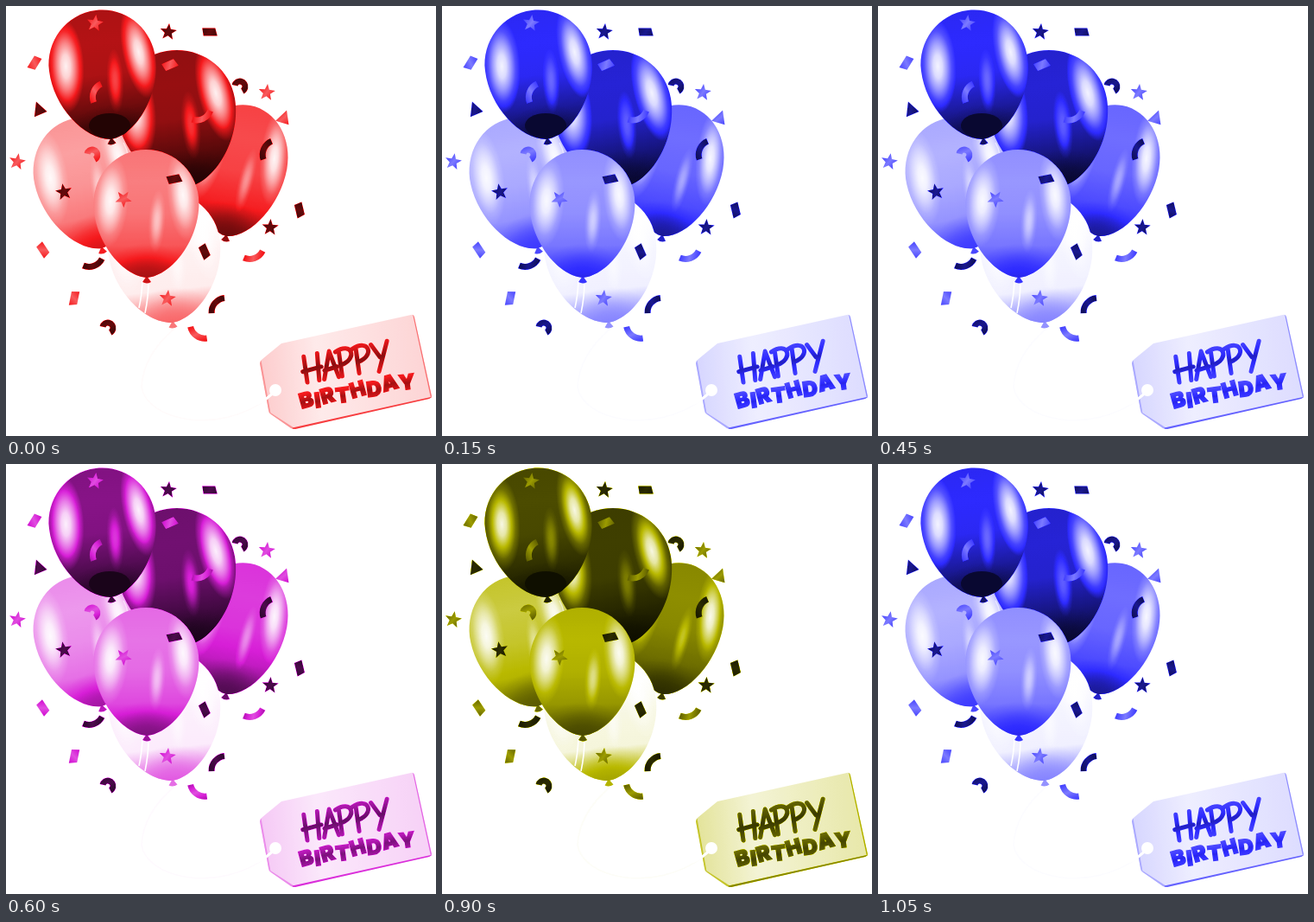
Animation, 498 px wide and 497 px high, one loop 1200 ms. Source, as an HTML page with a canvas:

```html
<!DOCTYPE html>
<html lang="en">
<head>
<meta charset="utf-8">
<title>Happy Birthday</title>
<style>
html, body { margin: 0; width: 100%; height: 100%; overflow: hidden; background: #fff; }
canvas { display: block; }
</style>
</head>
<body>
<canvas id="stage" width="498" height="497" role="img" aria-label="Happy Birthday balloons"></canvas>
<script>
const W = 498, H = 497, STEP = 150, DEG = Math.PI / 180;
const stage = document.getElementById('stage').getContext('2d');
const art = document.createElement('canvas');
art.width = W;
art.height = H;
const g = art.getContext('2d', { willReadFrequently: true });

// The scene is painted in grey; each hue then maps black - hue - white onto it.
const grey = (y, a = 1) => {
  const v = Math.round(Math.min(1, y) * 255);
  return `rgba(${v},${v},${v},${a})`;
};

function ramp(x0, y0, x1, y1, ...tones) {
  const fill = g.createLinearGradient(x0, y0, x1, y1);
  tones.forEach((y, i) => fill.addColorStop(i / (tones.length - 1), grey(y)));
  return fill;
}

function placed(x, y, angle, draw) {
  g.save();
  g.translate(x, y);
  g.rotate(angle);
  draw();
  g.restore();
}

function line(width, tone, path) {
  g.lineWidth = width;
  g.strokeStyle = grey(tone);
  g.stroke(new Path2D(path));
}

function glow(x, y, rx, ry, deg, tone, alpha) {
  placed(x, y, deg * DEG, () => {
    g.scale(rx, ry);
    const fill = g.createRadialGradient(0, 0, 0, 0, 0, 1);
    for (let d = 0; d <= 1; d += 0.25) {
      fill.addColorStop(d, grey(tone, alpha * (1 - d * d) ** 2));
    }
    g.fillStyle = fill;
    g.fillRect(-1, -1, 2, 2);
  });
}

// Runs from crown (tx, ty) to knot (bx, by); w is half the width.
function balloon(tx, ty, bx, by, w, tone) {
  const len = Math.hypot(bx - tx, by - ty);
  const low = tone ** 1.3, foot = 0.6 * tone ** 2 + 0.02;
  placed(tx, ty, Math.atan2(by - ty, bx - tx) - Math.PI / 2, () => {
    g.fillStyle = grey(foot + 0.05);
    g.beginPath();
    g.moveTo(0, len - 2);
    g.lineTo(5, len + 5);
    g.quadraticCurveTo(0, len + 8, -5, len + 5);
    g.fill();

    g.beginPath();
    g.moveTo(0, 0);
    g.bezierCurveTo(w * 0.56, 0, w, len * 0.19, w, len * 0.42);
    g.bezierCurveTo(w, len * 0.7, w * 0.5, len * 0.98, 0, len);
    g.bezierCurveTo(-w * 0.5, len * 0.98, -w, len * 0.7, -w, len * 0.42);
    g.bezierCurveTo(-w, len * 0.19, -w * 0.56, 0, 0, 0);
    g.fillStyle = ramp(0, 0, 0, len, tone, tone * 1.05, tone, low, foot);
    g.fill();
    g.clip();
    glow(-0.68 * w, 0.4 * len, 0.34 * w, 0.36 * len, 4, 1, 0.95);
    glow(0.7 * w, 0.36 * len, 0.3 * w, 0.36 * len, -5, 1, 0.95);
    glow(0.2 * w, 0.56 * len, 0.16 * w, 0.25 * len, 4, tone + 0.4, 0.6);
    glow(0, 0.98 * len, 0.8 * w, 0.25 * len, 0, foot, 0.7);
  });
}

function balloons() {
  balloon(283, 115, 255, 266, 55, 0.47);
  balloon(78, 130, 111, 280, 60, 0.7);
  balloon(186, 52, 212, 209, 69, 0.21);
  line(1.5, 0.92, 'M136 158Q140 165 141 172');
  balloon(104, 5, 122, 154, 62, 0.25);
  g.fillStyle = grey(0.05);
  g.beginPath();
  g.ellipse(120, 138, 24, 14, 0, 0, 7);
  g.fill();
  balloon(176, 215, 193, 366, 65, 0.96);
  line(1.6, 1, 'M158 318Q157 336 154 349M165 318Q165 336 161 355');
  balloon(162, 166, 163, 314, 61, 0.61);
}

// Each piece is x, y and a turn in degrees.
function scatter(tone, trace, ...pieces) {
  for (let i = 0; i < pieces.length; i += 3) {
    placed(pieces[i], pieces[i + 1], pieces[i + 2] * DEG, () => {
      g.fillStyle = g.strokeStyle = ramp(-10, -6, 10, 6, tone * 0.8, tone * 1.35, tone * 0.8);
      g.beginPath();
      trace();
    });
  }
}

function star() {
  for (let i = 0; i < 10; i++) {
    const a = (i / 5 - 0.5) * Math.PI, r = i % 2 ? 4.3 : 10;
    g.lineTo(r * Math.cos(a), r * Math.sin(a));
  }
  g.fill();
}

function shard() {
  g.moveTo(-9, -4);
  g.lineTo(6, -5);
  g.lineTo(9, 4);
  g.lineTo(-7, 5);
  g.fill();
}

function triangle() {
  g.moveTo(-8, 7);
  g.lineTo(0, -9);
  g.lineTo(8, 6);
  g.fill();
}

const strip = (radius, sweep) => () => {
  g.arc(0, -radius * 0.85, radius, (Math.PI - sweep) / 2, (Math.PI + sweep) / 2);
  g.lineWidth = 7;
  g.stroke();
};

function confetti() {
  const dark = 0.11, light = 0.4, ribbon = strip(17, 1.5), curl = strip(6, 4);
  scatter(dark, star, 188, 30, 6, 67, 215, -10, 306, 256, 3);
  scatter(light, star, 103, 20, 8, 302, 100, 6, 13, 180, 10, 136, 223, 34, 187, 338, 6);
  scatter(dark, shard, 236, 30, 4, 340, 236, 80, 230, 284, 70, 195, 200, -8);
  scatter(light, shard, 33, 66, 125, 43, 282, 60, 79, 338, 105, 190, 68, -20);
  scatter(dark, triangle, 38, 119, -20);
  scatter(light, triangle, 322, 129, 20);
  scatter(dark, ribbon, 101, 298, -20, 301, 166, 114, 244, 345, 130);
  scatter(light, ribbon, 287, 289, -20, 104, 100, 112, 227, 128, -25, 222, 379, 35);
  scatter(dark, curl, 274, 89, 217, 121, 368, 217);
  scatter(light, curl, 103, 168, 217);
}

function tag() {
  line(1.5, 0.99, 'M195 373C172 392 158 416 157 440C162 478 245 498 304 453');
  const shape = new Path2D('M319 390L469 357Q472 356 473 360L493 451Q493 453 490 454' +
    'L335 489Q332 489 330 488L307 472Q304 470 304 467L294 413Q294 410 297 408Z');
  g.save();
  g.fillStyle = ramp(296, 420, 492, 405, 0.86, 0.94, 0.91, 0.88);
  g.fill(shape);
  g.clip(shape);
  line(3, 0.7, 'M294 410L305 471L333 489');
  line(3, 0.46, 'M332 489L494 453');
  line(2, 0.6, 'M472 356L493 453');
  g.restore();
  g.fillStyle = '#fff';
  g.beginPath();
  g.arc(312, 444, 7, 0, 7);
  g.fill();
  line(1, 0.7);
  line(3, 1, 'M290 460Q303 455 312 444');
}

function brushed() {
  const forms = {
    H: 'M1 -30L0 0M17 -31L14 0M-3 -13L19 -15',
    A: 'M0 0L11 -31L17 0M2 -10L17 -12',
    P: 'M2 -29L1 0M-2 -29C19 -38 23 -17 2 -13',
    Y: 'M0 -30L8 -14M19 -31L4 2'
  };
  placed(349, 435, -10 * DEG, () => {
    g.lineCap = g.lineJoin = 'round';
    g.lineWidth = 5;
    [...'HAPPY'].forEach(letter => {
      g.strokeStyle = ramp(0, -32, 0, 2, 0.34, 0.2, 0.34);
      g.stroke(new Path2D(forms[letter]));
      g.translate(20, 0);
    });
  });
}

function printed(word) {
  g.font = '900 24px Inter, "Liberation Sans", sans-serif';
  g.textAlign = 'center';
  g.textBaseline = 'middle';
  g.lineWidth = 1.4;
  const gap = 1, widths = [...word].map(c => g.measureText(c).width + gap);
  let x = -widths.reduce((a, b) => a + b) / 2;
  placed(407, 446, -11.5 * DEG, () => {
    [...word].forEach((letter, i) => {
      const side = i % 2 ? 1 : -1;
      placed(x + widths[i] / 2, side * 1.5, side * 4 * DEG, () => {
        g.fillStyle = g.strokeStyle = ramp(0, -9, 0, 9, 0.36, 0.24, 0.32);
        g.fillText(letter, 0, 0);
        g.strokeText(letter, 0, 0);
      });
      x += widths[i];
    });
  });
}

function tint(hue, source) {
  const out = new ImageData(W, H);
  const luma = (0.299 * hue[0] + 0.587 * hue[1] + 0.114 * hue[2]) / 255;
  for (let i = 0; i < source.length; i += 4) {
    const y = source[i] / 255;
    hue.forEach((c, k) => {
      out.data[i + k] = y < luma ? c * y / luma : c + (255 - c) * (y - luma) / (1 - luma);
    });
    out.data[i + 3] = 255;
  }
  return out;
}

g.fillStyle = '#fff';
g.fillRect(0, 0, W, H);
balloons();
confetti();
tag();
brushed();
printed('BIRTHDAY');

const pixels = g.getImageData(0, 0, W, H).data;
const [red, green, blue, magenta, yellow] = [
  [245, 25, 28], [25, 150, 30], [45, 42, 255], [215, 30, 215], [185, 185, 0]
].map(hue => tint(hue, pixels));
const cycle = [red, blue, green, blue, magenta, blue, yellow, blue];

const start = performance.now();
let shown = -1;
function draw(now) {
  const step = Math.floor(Math.max(0, now - start) / STEP) % cycle.length;
  if (step !== shown) stage.putImageData(cycle[shown = step], 0, 0);
  requestAnimationFrame(draw);
}
draw(start);
</script>
</body>
</html>
```
